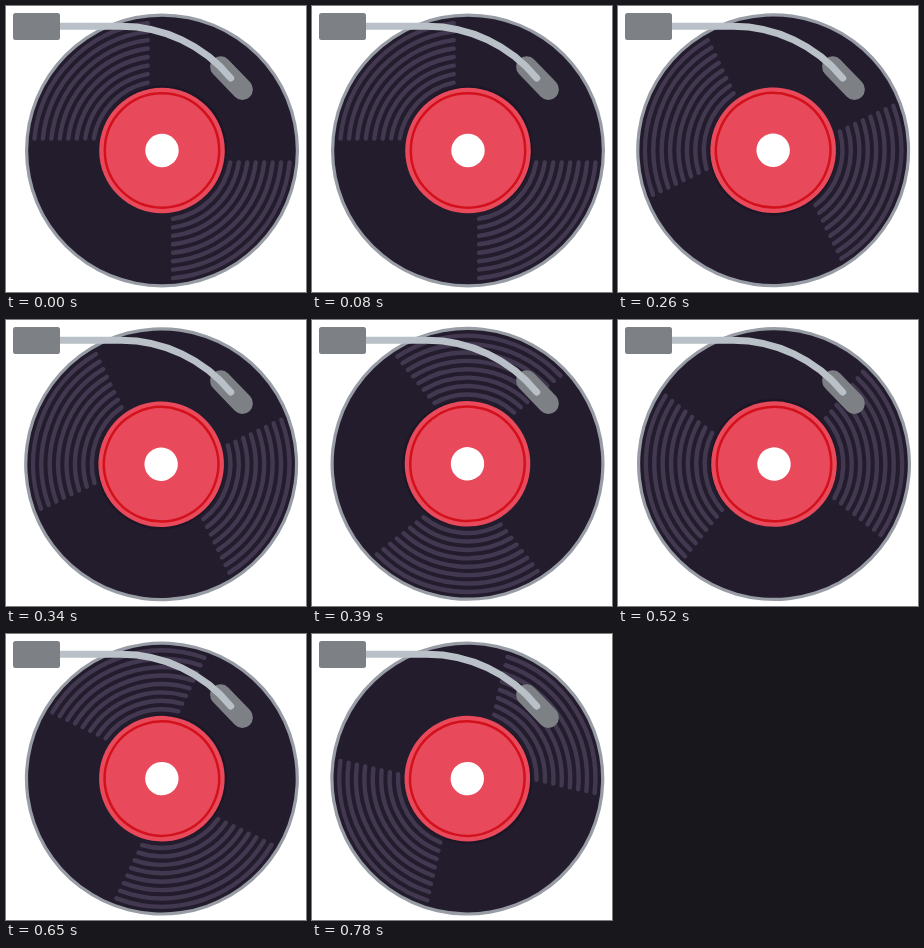
These frames come from a looping animation (300x286 px, 910 ms). An HTML page with a canvas:

```html
<!DOCTYPE html>
<html lang="en">
<head>
<meta charset="utf-8">
<title>Turntable</title>
<style>
html, body { margin: 0; width: 100%; height: 100%; overflow: hidden; background: #fff; }
canvas { display: block; width: 300px; height: 286px; }
</style>
</head>
<body>
<canvas id="stage"></canvas>
<script>
const W = 300, H = 286;
const STEP_MS = 130, STEPS = 7;
const TURN = 3 * Math.PI / STEPS; // one and a half turns per loop
const PIVOT = { x: 155.6, y: 144.25 };
const WOBBLE = { x: 0.4, y: 0.2 }; // the record sits slightly off its pivot

const canvas = document.getElementById('stage');
const ctx = canvas.getContext('2d');
const scale = window.devicePixelRatio || 1;
canvas.width = W * scale;
canvas.height = H * scale;
ctx.scale(scale, scale);

function disc(x, y, r, color) {
  ctx.beginPath();
  ctx.arc(x, y, r, 0, 2 * Math.PI);
  ctx.fillStyle = color;
  ctx.fill();
}

function stroke(color, width, cap = 'butt') {
  ctx.strokeStyle = color;
  ctx.lineWidth = width;
  ctx.lineCap = cap;
  ctx.stroke();
}

// Arcs fill one quadrant, ending on lines parallel to its two axes.
function drawGrooves(start, startInset, endInset) {
  for (let i = 0; i < 8; i++) {
    const r = 69.3 + i * 8.4;
    const from = start + Math.asin(startInset / r);
    const to = start + Math.PI / 2 - Math.asin(endInset / r);
    ctx.beginPath();
    ctx.arc(0, 0, r, from, to);
    stroke('#423950', 4.4, 'round');
  }
}

function drawRecord(angle) {
  ctx.save();
  ctx.translate(PIVOT.x, PIVOT.y);
  ctx.rotate(angle);
  ctx.translate(WOBBLE.x, WOBBLE.y);

  disc(0, 0, 137, '#979ca5');
  disc(0, 0, 133.8, '#231c2d');
  drawGrooves(0, 12, 11);
  drawGrooves(Math.PI, 12, 14.3);

  disc(1.3, -1.5, 63.5, '#1d1626');
  disc(0, 0, 62.8, '#e84a5b');
  ctx.beginPath();
  ctx.arc(0, 0, 57.2, 0, 2 * Math.PI);
  stroke('#d3111d', 2.5);
  disc(0, 0, 16.7, '#fff');
  ctx.restore();
}

function drawArm() {
  ctx.beginPath();
  ctx.moveTo(214.6, 60.8);
  ctx.lineTo(236.4, 83.4);
  stroke('#7d8185', 21, 'round');

  ctx.beginPath();
  ctx.moveTo(52, 20.3);
  ctx.arc(115, 162.3, 142, -Math.PI / 2, -0.688);
  stroke('#b9c0c7', 7, 'round');

  ctx.beginPath();
  ctx.roundRect(7, 7, 47, 27, 2.5);
  ctx.fillStyle = '#7d8185';
  ctx.fill();
}

const origin = performance.now();

function draw() {
  const elapsed = performance.now() - origin;
  const step = Math.floor(elapsed / STEP_MS) % STEPS;
  ctx.fillStyle = '#fff';
  ctx.fillRect(0, 0, W, H);
  drawRecord(step * TURN);
  drawArm();
  requestAnimationFrame(draw);
}
draw();
</script>
</body>
</html>
```
